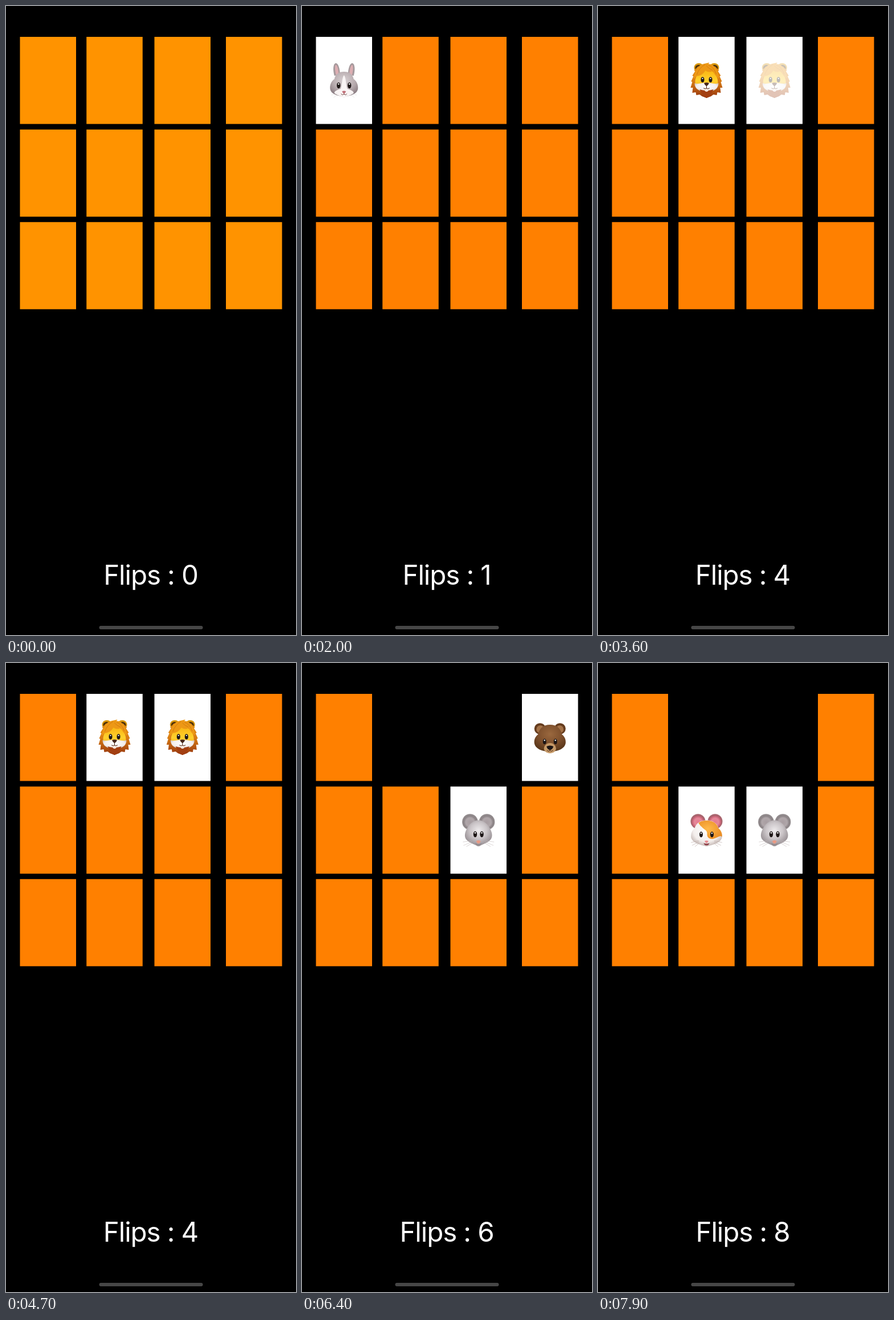
Animation, 509 px wide and 1101 px high, one loop 8 s. Source, as an HTML page:

```html
<!DOCTYPE html>
<html lang="en">
<head>
<meta charset="utf-8">
<title>Memory cards</title>
<style>
  html, body { margin: 0; width: 100%; height: 100%; overflow: hidden; background: #000; }
  svg { display: block; width: 100%; height: 100%; }
  #flips { font: 47.5px Inter, Roboto, sans-serif; letter-spacing: -1.1px; fill: #fff; text-anchor: middle; }
</style>
</head>
<body>
<svg viewBox="0 0 509 1101">
  <defs>
    <radialGradient id="fur" cx=".5" cy=".35" r=".65">
      <stop offset="0" stop-color="#d8d0d2"/><stop offset=".6" stop-color="#b9adb0"/><stop offset="1" stop-color="#8d7f84"/>
    </radialGradient>
    <radialGradient id="mouseFur" cx=".5" cy=".4" r=".62">
      <stop offset="0" stop-color="#eeebed"/><stop offset=".5" stop-color="#cbc5c8"/><stop offset="1" stop-color="#8f878b"/>
    </radialGradient>
    <radialGradient id="greyEar">
      <stop offset="0" stop-color="#a89da1"/><stop offset=".65" stop-color="#b0a7aa"/><stop offset="1" stop-color="#857d80"/>
    </radialGradient>
    <radialGradient id="pinkEar">
      <stop offset="0" stop-color="#e8788f"/><stop offset=".6" stop-color="#e48a9a"/><stop offset="1" stop-color="#c95a70"/>
    </radialGradient>
    <linearGradient id="mane" x2="0" y2="1">
      <stop offset="0" stop-color="#e99413"/><stop offset=".5" stop-color="#d97d14"/><stop offset="1" stop-color="#96350f"/>
    </linearGradient>
    <linearGradient id="gold" x2="0" y2="1">
      <stop offset="0" stop-color="#f8b411"/><stop offset=".5" stop-color="#ffd02c"/><stop offset="1" stop-color="#f0a722"/>
    </linearGradient>
    <radialGradient id="brown" cx=".5" cy=".35" r=".65">
      <stop offset="0" stop-color="#9a683e"/><stop offset=".6" stop-color="#7d4f2c"/><stop offset="1" stop-color="#593619"/>
    </radialGradient>
    <radialGradient id="cream" cx=".5" cy=".4" r=".65">
      <stop offset="0" stop-color="#fff"/><stop offset=".65" stop-color="#f3eeec"/><stop offset="1" stop-color="#b9aaa6"/>
    </radialGradient>
    <radialGradient id="patch" cx=".4" cy=".45" r=".7">
      <stop offset="0" stop-color="#ffb94a"/><stop offset="1" stop-color="#e98a22"/>
    </radialGradient>
  </defs>
  <rect width="509" height="1101"/>
  <g id="board"></g>
  <text id="flips" x="254" y="1012.5"></text>
  <rect x="163.5" y="1085" width="182" height="6" rx="3" fill="#464646"/>
</svg>
<script>
const columns = [24.5, 141.25, 260.5, 386], rows = [54, 216.25, 378.25];
const cardWidth = 98.5, cardHeight = 152.5;

const pair = art => art + `<g transform="scale(-1 1)">${art}</g>`;
const path = (d, fill, extra = '') => `<path d="${d}" fill="${fill}" ${extra}/>`;
const oval = (x, y, rx, ry, fill) => `<ellipse cx="${x}" cy="${y}" rx="${rx}" ry="${ry}" fill="${fill}"/>`;
const line = (d, color, width = .6) => path(d, 'none', `stroke="${color}" stroke-width="${width}" stroke-linecap="round"`);
const eyes = (x, y, rx, ry) => [-x, x].map(cx =>
  oval(cx, y, rx, ry, '#1c1515') + oval(cx, y - ry * .45, rx * .38, ry * .25, '#fff')).join('');

const animals = {
  rabbit:
    pair(path('M7-9C7-20 10-30 14.5-30C19-29 20-19 17-8Z', '#a69a9d')
      + path('M9.5-10C9.5-19 12-27 14.5-27C16.5-25 16-17 14-9Z', '#dcaeb2'))
    + path('M0-15C9-15 15-11 17-2C22 1 25 8 24.5 14C24 24 11 28 0 28C-11 28-24 24-24.5 14C-25 8-22 1-17-2C-15-11-9-15 0-15Z', 'url(#fur)')
    + path('M0-9C4-4 3 9 6 15C12 17 17 19 17 22C12 27 5 28 0 28C-5 28-12 27-17 22C-17 19-12 17-6 15C-3 9-4-4 0-9Z', '#faf5f5')
    + eyes(9.5, 9, 3.2, 5.2)
    + path('M-2.5 25H2.5V29Q0 30.5-2.5 29Z', '#fff', 'stroke="#e3d0d1" stroke-width=".5"')
    + line('M0 23V25M-5 24Q-2 27 0 24Q2 27 5 24', '#764c4c', 1)
    + path('M-3.5 19.5Q0 17.5 3.5 19.5Q2 23 0 23.5Q-2 23-3.5 19.5Z', '#c16e77')
    + pair(line('M12 23L22 26M11 25L18 30', '#ddd')),
  lion:
    pair(oval(13.5, -22, 8.5, 8, '#d9980f') + oval(14, -21.5, 6, 5.5, '#4f3108') + oval(13, -20, 4, 4, '#f8d43f'))
    + pair(path('M-1-29L8-28 16-23 22-17 20-16 25-8 23-7 27 2 25 3 28 13 24 13 25 22 19 21 18 26 12 25 8 28 0 31-1 31Z', 'url(#mane)'))
    + path('M0-19C12-18 20-8 20 4C21 14 12 19 0 20C-12 19-21 14-20 4C-20-8-12-18 0-19Z', 'url(#gold)')
    + path('M0 5C6 3 14 8 21 5C21 15 13 20 0 20C-13 20-21 15-21 5C-14 8-6 3 0 5Z', 'url(#cream)')
    + path('M-12 16Q0 20 12 16Q9 25 0 31Q-9 25-12 16Z', '#a33f12')
    + path('M-5 15Q0 13 5 15Q3 20 0 20Q-3 20-5 15Z', '#f6e9df')
    + path('M-23-2Q-20-24-4-29L5-31 3-28Q20-25 22-3Q14-8 11-17Q6-12-2-17Q-7-8-18-7Z', '#ed9815')
    + line('M-3-27Q-13-22-17-10M4-26Q13-23 17-11M0-25Q4-20 10-18', '#cf7810', .9)
    + eyes(7, -1, 3, 4.7)
    + line('M0 10V14M-5 14Q-2 16 0 14Q2 16 5 14', '#4a2312', 1)
    + path('M-4.5 5Q0 3 4.5 5Q3 9 0 10.5Q-3 9-4.5 5Z', '#45261a'),
  bear:
    pair(oval(17.5, -15, 10, 9.8, '#653c1e') + oval(17, -14, 6.8, 6.8, '#a57349'))
    + path('M0-22C12-22 19-15 21-5C26-1 28 4 27.5 10C26 21 12 25 0 25C-12 25-26 21-27.5 10C-28 4-26-1-21-5C-19-15-12-22 0-22Z', 'url(#brown)')
    + path('M0 10C7 10 11 16 10.5 21C9 26 4 28 0 28C-4 28-9 26-10.5 21C-11 16-7 10 0 10Z', '#c59968')
    + eyes(9.5, 7.5, 3, 4.8)
    + line('M0 21V23M-5 23Q-2 26 0 23Q2 26 5 23', '#4c2b18', 1)
    + path('M-6 16Q0 13 6 16Q5 21 0 22.5Q-5 21-6 16Z', '#1c1414'),
  mouse:
    pair(oval(14.8, -14, 13.8, 14, '#918a8c') + oval(14.8, -13.5, 11.5, 11.5, 'url(#greyEar)'))
    + path('M0-17C9-17 17-10 21-1C24 5 25 11 22 16C16 23 7 25 4 27Q0 30-4 27C-7 25-16 23-22 16C-25 11-24 5-21-1C-17-10-9-17 0-17Z', 'url(#mouseFur)')
    + eyes(5.8, 7.5, 3.2, 5.2)
    + line('M-5 24Q0 28 5 24', '#85777a', .8)
    + path('M-4 19.5Q0 16.5 4 19.5Q3 23 0 24Q-3 23-4 19.5Z', '#e99a85')
    + pair(line('M13 19L27 21M12 21L26 27M11 23L21 29', '#c3b9b9')),
  hamster:
    pair(oval(15, -15, 13, 13, '#a9656e') + oval(15, -14, 10.5, 10.5, 'url(#pinkEar)'))
    + path('M0-17C11-17 18-12 21-3C26 1 28 8 27 14C24 23 11 26 3 28Q0 29-3 28C-11 26-24 23-27 14C-28 8-26 1-21-3C-18-12-11-17 0-17Z', 'url(#cream)')
    + path('M-14-12C-8-18 9-18 16-11C19-8 20-5 21-3C26 1 28 8 27 12C23 9 21 13 16 14C8 18 0 15 1 6C1 0-5-1-8-5Q-11-7-14-12Z', 'url(#patch)')
    + eyes(9.5, 8, 3, 5)
    + path('M-5 23Q0 25 5 23Q4 27 0 27Q-4 27-5 23Z', '#92434b')
    + path('M-3.5 19.5Q0 17.5 3.5 19.5Q2 22.5 0 23Q-2 22.5-3.5 19.5Z', '#e98b91')
    + pair(line('M14 19L27 22M14 21L25 27M13 23L20 29', '#b9a7a3')),
};

const scenes = [
  { at: 0, flips: 0 },
  { at: 2000, flips: 1, open: { 0: 'rabbit' } },
  { at: 2800, flips: 2, open: { 0: 'rabbit', 2: 'lion' } },
  { at: 3600, flips: 4, open: { 1: 'lion', 2: 'lion' }, fading: 2 },
  { at: 5300, flips: 5, open: { 3: 'bear' }, gone: [1, 2] },
  { at: 6400, flips: 6, open: { 3: 'bear', 6: 'mouse' }, gone: [1, 2] },
  { at: 7200, flips: 8, open: { 5: 'hamster', 6: 'mouse' }, gone: [1, 2], fading: 6 },
];

const board = document.getElementById('board');
const label = document.getElementById('flips');

function drawCard(scene, index) {
  const { open = {}, gone = [], fading } = scene;
  if (gone.includes(index)) return '';
  const x = columns[index % 4], y = rows[Math.floor(index / 4)];
  const animal = open[index];
  const back = scene.at ? '#ff8000' : '#ff9300';
  const card = `<rect x="${x}" y="${y}" width="${cardWidth}" height="${cardHeight}" fill="${animal ? '#fff' : back}"/>`;
  if (!animal) return card;
  return card + `<g ${index === fading ? 'id="fading"' : ''} transform="translate(${x + cardWidth / 2} ${y + cardHeight / 2 - .3})">${animals[animal]}</g>`;
}

let shown;
function render(now) {
  const time = now % 8000;
  const scene = scenes.findLast(s => s.at <= time);
  if (scene !== shown) {
    board.innerHTML = Array.from({ length: 12 }, (_, i) => drawCard(scene, i)).join('');
    label.textContent = `Flips : ${scene.flips}`;
    shown = scene;
  }
  // A pressed card's picture returns to full strength in 100 ms steps.
  const step = Math.min(5, Math.floor((time - scene.at) / 100));
  document.getElementById('fading')?.setAttribute('opacity', .3 + .14 * step);
}

const start = performance.now();
function tick() {
  render(performance.now() - start);
  requestAnimationFrame(tick);
}
tick();
</script>
</body>
</html>
```
